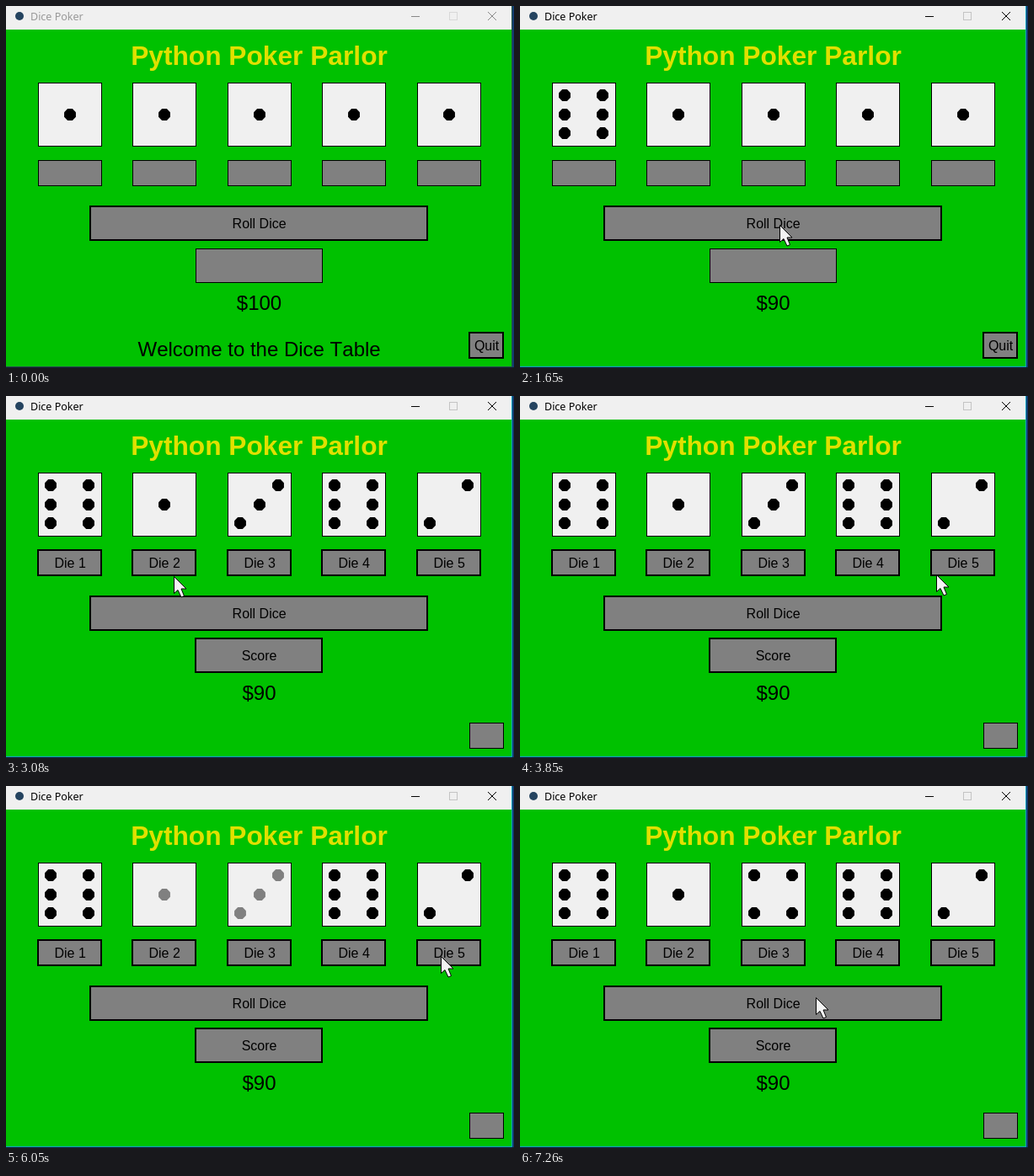
Write an HTML page with a canvas that moves like this. It is 603 by 430 pixels and loops after 8 s.

```html
<!DOCTYPE html>
<html lang="en">
<head>
<meta charset="utf-8">
<title>Dice Poker</title>
<style>
  html, body { margin: 0; width: 100%; height: 100%; overflow: hidden; background: #00c100; }
  canvas { display: block; }
</style>
</head>
<body>
<canvas id="stage" width="603" height="430"></canvas>
<script>
const ctx = document.getElementById('stage').getContext('2d');
const LOOP = 8000, TICK = 110; // all times below are in ticks
const SANS = '"Liberation Sans", Arial, sans-serif';
const dieX = i => Math.floor(38 + 112.5 * i);

const MOUSE_IN = 5, FOCUS = 11, ROLL = 15, CHOOSE = 17, REROLL = 62;
const heldFrom = { 1: 43, 2: 50, 4: 57 };

// Mouse moves: start, end, goal x, goal y, optional sag
const entry = [414, 433];
const moves = [
  [4, 9, 308, 260], [25, 29, 179, 206], [29, 30, 209, 212], [31, 34, 547, 212],
  [34, 38, 209, 213], [39, 41, 175, 214], [42, 43, 183, 203], [43, 47, 327, 199],
  [50, 55, 516, 202, 22], [57, 61, 386, 260], [65, 66, 351, 251]
];

function mouseAt(tick) {
  let [x, y] = entry;
  for (const [start, end, goalX, goalY, sag = 0] of moves) {
    const k = Math.min(1, Math.max(0, (tick - start) / (end - start)));
    const ease = k * k * (3 - 2 * k);
    x += (goalX - x) * ease;
    y += (goalY - y) * ease + sag * Math.sin(Math.PI * k);
    if (k < 1) break;
  }
  return [Math.round(x), Math.round(y)];
}

function fill(color, x, y, w, h) {
  ctx.fillStyle = color;
  ctx.fillRect(x, y, w, h);
}

function shape(points, color) {
  ctx.beginPath();
  for (const [x, y] of points) ctx.lineTo(x, y);
  ctx.closePath();
  ctx.fillStyle = color;
  ctx.fill();
}

function text(str, x, y, font, color = '#000', align = 'center') {
  ctx.font = font;
  ctx.fillStyle = color;
  ctx.textAlign = align;
  ctx.fillText(str, x, y);
}

function box(x, y, w, h, color, line) {
  const o = line === 1 ? 0.5 : 0;
  fill(color, x, y, w, h);
  ctx.strokeStyle = '#000';
  ctx.lineWidth = line;
  ctx.strokeRect(x + o, y + o, w, h);
}

function button(label, x, y, w, h, active) {
  box(x, y, w, h, '#808080', active ? 2 : 1);
  if (active) text(label, x + w / 2 + 0.6, y + h / 2 + 6, '16px ' + SANS);
}

function pip(x, y, color) {
  const corners = Array.from({ length: 8 }, (_, i) => {
    const a = (i + 0.5) * Math.PI / 4;
    return [x + 7.5 * Math.cos(a), y + 7.5 * Math.sin(a)];
  });
  shape(corners, color);
}

function die(x, value, held) {
  box(x, 91, 75, 75, '#f0f0f0', 1);
  const spots = [];
  if (value % 2) spots.push([0, 0]);
  if (value > 1) spots.push([-1, 1], [1, -1]);
  if (value > 3) spots.push([-1, -1], [1, 1]);
  if (value === 6) spots.push([-1, 0], [1, 0]);
  for (const [col, row] of spots) {
    pip(x + Math.ceil(37.5 + 22.5 * col), Math.ceil(128.5 + 22.5 * row), held ? '#808080' : '#000');
  }
}

function windowFrame(active) {
  fill('#123c70', 601, 0, 2, 430);
  fill('#10202c', 0, 429, 603, 1);
  fill(active ? '#10a4c4' : '#285848', 0, 0, 601, 429);
  fill('#00c100', 0, 28, 600, 400);
  fill('#f0f0f0', 0, 0, 600, 28);

  ctx.fillStyle = '#24435f';
  ctx.beginPath();
  ctx.arc(16, 12, 5, 0, 7);
  ctx.fill();
  text('Dice Poker', 29, 17, '12.5px "Noto Sans", sans-serif', active ? '#000' : '#999', 'left');

  ctx.lineWidth = 1;
  ctx.strokeStyle = active ? '#c4c4c4' : '#d8d8d8';
  ctx.strokeRect(526.5, 7.5, 9, 9);
  ctx.strokeStyle = active ? '#000' : '#888';
  ctx.stroke(new Path2D('M481 12.5h10M572 7l10 10M582 7l-10 10'));
}

function arrow([x, y]) {
  const points = [[0, 0], [0, 20], [4.5, 16], [8.5, 24.5], [12, 23], [8.5, 14.5], [14.5, 14.5]];
  shape(points.map(([px, py]) => [x + px + 0.5, y + py + 0.5]), '#f4f4f4');
  ctx.strokeStyle = '#000';
  ctx.lineWidth = 1;
  ctx.stroke();
}

function valuesAt(tick) {
  if (tick < ROLL) return [1, 1, 1, 1, 1];
  if (tick === ROLL) return [6, 1, 1, 1, 1];
  return [6, 1, tick > REROLL ? 4 : 3, 6, 2];
}

function draw(tick) {
  const rolled = tick >= ROLL, choosing = tick >= CHOOSE;
  ctx.fontKerning = 'none';
  windowFrame(tick >= FOCUS);
  text('Python Poker Parlor', 300.5, 70, 'bold 31.7px ' + SANS, '#e0e000');
  valuesAt(tick).forEach((value, i) => {
    die(dieX(i), value, tick >= heldFrom[i] && tick < REROLL);
    button('Die ' + (i + 1), dieX(i), 183, 75, 30, choosing);
  });
  button('Roll Dice', 100, 238, 400, 40, true);
  button('Score', 225, 288, 150, 40, choosing);
  button('Quit', 550, 388, 40, 30, !choosing);
  text(rolled ? '$90' : '$100', 300.5, 361, '24px ' + SANS);
  if (!rolled) text('Welcome to the Dice Table', 300.6, 416, '24px ' + SANS);
  if (tick >= MOUSE_IN) arrow(mouseAt(tick));
}

function loop() {
  draw(Math.floor(performance.now() % LOOP / TICK));
  requestAnimationFrame(loop);
}
loop();
</script>
</body>
</html>
```
